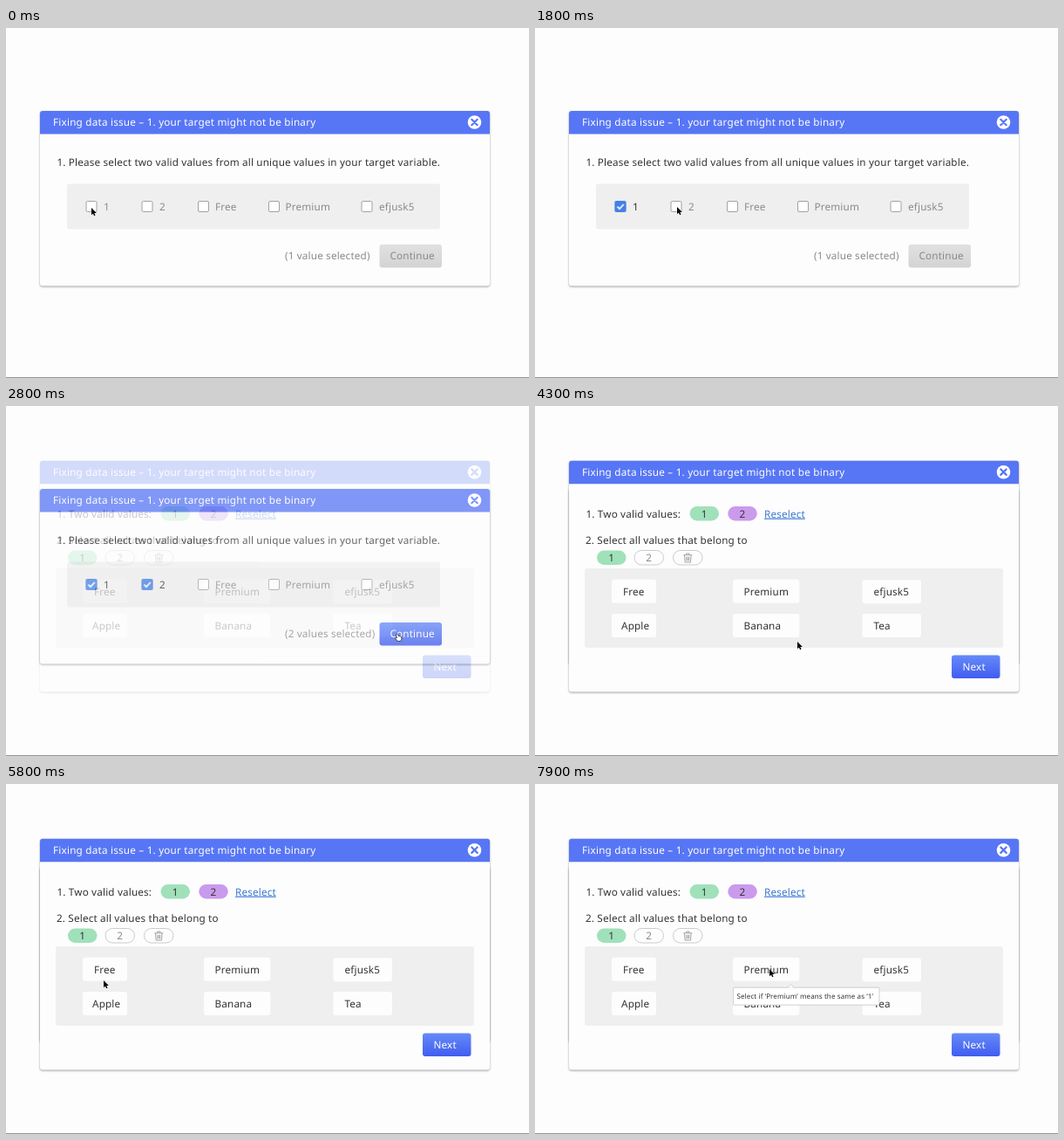
Animation of 600x401 px, one loop 8 s. Source, as an HTML page:

```html
<!DOCTYPE html>
<html lang="en">
<head>
<meta charset="utf-8">
<title>Fixing data issue</title>
<style>
html, body { margin: 0; width: 100%; height: 100%; overflow: hidden; background: #fdfdfd; }
svg { display: block; width: 600px; height: 401px; }
text {
  font: 11.7px "Noto Sans", "Open Sans", sans-serif;
  letter-spacing: .17px;
  text-rendering: geometricPrecision;
  fill: #333;
}
.title { letter-spacing: .22px; fill: #fff; }
.mid { text-anchor: middle; }
.grey { fill: #8a8a8a; }
.white { fill: #fff; }
.link { fill: #3b78d2; text-decoration: underline; }
.dialog { filter: drop-shadow(0 1px 1px rgba(0, 0, 0, .38)); }
.panel { fill: #efefef; }
.card { fill: #fdfdfd; }
.outline { fill: #fdfdfd; stroke: #ccc; }
.box { fill: #fff; stroke: #a2a2a2; }
.tip rect, .tip path { fill: #fff; stroke: #c4c4c4; stroke-width: .8; }
.tip text { font-size: 8px; letter-spacing: .1px; }

/* 100 ms = 1.25% */
.anim { animation: 8s step-end infinite; }
.ripple { animation-name: ripple; }
.check1 { animation-name: check1; }
.label1 { animation-name: label1; }
.check2 { animation-name: check2; }
.label2 { animation-name: label2; }
.before { animation-name: before; }
.after { animation-name: after; }
.second { animation-name: second; }
.tip1 { animation-name: tip1; }
.tip2 { animation-name: tip2; }
.cursor { animation-name: cursor; }
.arrow { animation-name: arrow; }
.hand { animation-name: hand; }

@keyframes ripple {
  0% { opacity: 0; transform: scale(.3); }
  3.75% { opacity: .5; transform: scale(.4); }
  5% { opacity: .35; transform: scale(.7); }
  6.25% { opacity: .2; transform: scale(1); }
  7.5%, 100% { opacity: 0; transform: scale(1); }
}
@keyframes check1 { 0% { opacity: 0; } 12.5% { opacity: .5; } 13.75%, 100% { opacity: 1; } }
@keyframes label1 { 0% { fill: #8a8a8a; } 12.5% { fill: #5e5e5e; } 13.75%, 100% { fill: #333; } }
@keyframes check2 { 0% { opacity: 0; } 23.75% { opacity: .5; } 25%, 100% { opacity: 1; } }
@keyframes label2 { 0% { fill: #8a8a8a; } 23.75% { fill: #5e5e5e; } 25%, 100% { fill: #333; } }
@keyframes before { 0% { opacity: 1; } 25%, 100% { opacity: 0; } }
@keyframes after { 0% { opacity: 0; } 25%, 100% { opacity: 1; } }
@keyframes second {
  0% { opacity: 0; }
  33.75% { opacity: 0; animation-timing-function: steps(4); }
  38.75%, 100% { opacity: 1; }
}
@keyframes tip1 {
  0% { opacity: 0; }
  72.5% { opacity: 0; animation-timing-function: steps(3); }
  76.25% { opacity: 1; }
  83.75%, 100% { opacity: 0; }
}
@keyframes tip2 {
  0% { opacity: 0; }
  85% { opacity: 0; animation-timing-function: steps(2); }
  87.5%, 100% { opacity: 1; }
}
@keyframes cursor {
  0% { transform: translate(98px, 206px); }
  15% { transform: translate(98px, 206px); animation-timing-function: steps(3); }
  18.75% { transform: translate(163px, 205px); }
  25% { transform: translate(163px, 205px); animation-timing-function: steps(6); }
  32.5% { transform: translate(448px, 261px); }
  53.75% { transform: translate(301px, 270px); }
  55% { transform: translate(301px, 270px); animation-timing-function: steps(4); }
  60% { transform: translate(200px, 222px); animation-timing-function: steps(3); }
  63.75% { transform: translate(116px, 213px); }
  65% { transform: translate(116px, 213px); animation-timing-function: steps(5); }
  71.25% { transform: translate(112px, 225px); }
  77.5% { transform: translate(111px, 223px); }
  82.5% { transform: translate(111px, 223px); animation-timing-function: steps(3); }
  86.25%, 100% { transform: translate(269px, 212px); }
}
@keyframes arrow { 0% { opacity: 1; } 32.5% { opacity: 0; } 37.5%, 100% { opacity: 1; } }
@keyframes hand { 0% { opacity: 0; } 32.5% { opacity: 1; } 37.5%, 100% { opacity: 0; } }
</style>
</head>
<body>
<svg viewBox="0 0 600 401">
  <defs>
    <linearGradient id="blue" x2="0" y2="1">
      <stop stop-color="#668af9"/><stop offset="1" stop-color="#405df0"/>
    </linearGradient>
    <linearGradient id="dull" x2="0" y2="1">
      <stop stop-color="#e1e1e1"/><stop offset="1" stop-color="#d3d3d3"/>
    </linearGradient>
    <g id="header">
      <path d="M39 26.5V3a3 3 0 0 1 3-3H552a3 3 0 0 1 3 3V26.5Z" fill="#5776f5"/>
      <text class="title" x="54" y="17.3">Fixing data issue – 1. your target might not be binary</text>
      <circle cx="537.5" cy="13" r="7.8" fill="#fff"/>
      <path d="M534.3 9.8l6.4 6.4m0-6.4l-6.4 6.4" stroke="#5776f5" stroke-width="2.2" stroke-linecap="round"/>
    </g>
    <rect id="box" class="box" x=".5" y=".5" width="12" height="12" rx="1.5"/>
    <g id="tick">
      <rect width="13" height="13" rx="2" fill="#4480e8"/>
      <path d="M3 6.7l2.5 2.6L10.2 4" fill="none" stroke="#fff" stroke-width="1.7"/>
    </g>
    <rect id="pill" width="33.5" height="16.5" rx="8.25"/>
  </defs>

  <rect width="600" height="401" fill="#fdfdfd"/>
  <path d="M0 400.5H600" stroke="#949494"/>

  <g class="dialog">
    <rect x="39" y="95" width="516" height="200.5" rx="3" fill="#fdfdfd"/>
    <use href="#header" y="95"/>
    <text x="58.5" y="158.3">1. Please select two valid values from all unique values in your target variable.</text>
    <rect class="panel" x="70" y="178.5" width="428" height="52" rx="3"/>
    <use href="#box" x="91.5" y="198"/>
    <use href="#box" x="155.5" y="198"/>
    <use href="#box" x="220" y="198"/>
    <use href="#box" x="301" y="198"/>
    <use href="#box" x="407.5" y="198"/>
    <use href="#tick" class="anim check1" x="91.5" y="198"/>
    <use href="#tick" class="anim check2" x="155.5" y="198"/>
    <text class="anim label1" x="112" y="208.8">1</text>
    <text class="anim label2" x="176" y="208.8">2</text>
    <text class="grey" x="240" y="208.8">Free</text>
    <text class="grey" x="320.5" y="208.8">Premium</text>
    <text class="grey" x="428" y="208.8">efjusk5</text>
    <g class="anim before">
      <text class="grey" x="320" y="265.3">(1 value selected)</text>
      <rect x="428.5" y="248" width="71.5" height="26.5" rx="3" fill="url(#dull)"/>
      <text class="grey" x="440.5" y="265.3">Continue</text>
    </g>
    <g class="anim after">
      <text class="grey" x="320" y="265.3">(2 values selected)</text>
      <rect x="428.5" y="248" width="71.5" height="26.5" rx="3" fill="url(#blue)"/>
      <text class="white" x="440.5" y="265.3">Continue</text>
    </g>
  </g>

  <g class="anim second">
    <g class="dialog">
      <rect x="39" y="63" width="516" height="264.5" rx="3" fill="#fdfdfd"/>
      <use href="#header" y="62.7"/>
      <text x="58.5" y="127.6">1. Two valid values:</text>
      <use href="#pill" x="177.5" y="115" fill="#a0e1ba"/>
      <text class="mid" x="194.3" y="127.6">1</text>
      <use href="#pill" x="221.3" y="115" fill="#ca9aec"/>
      <text class="mid" x="238" y="127.6">2</text>
      <text class="link" x="263" y="127.6">Reselect</text>
      <text x="58" y="157.6">2. Select all values that belong to</text>
      <use href="#pill" x="71" y="165.5" fill="#a0e1ba"/>
      <text class="mid" x="87.8" y="178">1</text>
      <use href="#pill" class="outline" x="114" y="165.5"/>
      <text class="mid grey" x="130.8" y="178">2</text>
      <use href="#pill" class="outline" x="158.5" y="165.5"/>
      <path d="M170.3 170.8h10M173.6 170.5v-1.4h3.4v1.4M171.5 171l.6 8h6.4l.6-8M173.8 172.8v4.6M175.3 172.8v4.6M176.8 172.8v4.6" fill="none" stroke="#8f8f8f" stroke-width=".8"/>

      <rect class="panel" x="57" y="186" width="480" height="91" rx="3"/>
      <g class="card">
        <rect x="88" y="198.7" width="51" height="27" rx="3"/>
        <rect x="227" y="198.7" width="76.3" height="27" rx="3"/>
        <rect x="375.5" y="199.3" width="67.5" height="27" rx="3"/>
        <rect x="88" y="238" width="51" height="27" rx="3"/>
        <rect x="227" y="238" width="76.3" height="27" rx="3"/>
        <rect x="375.5" y="238" width="67.5" height="27" rx="3"/>
      </g>
      <text x="101" y="216.5">Free</text>
      <text x="239.5" y="216.5">Premium</text>
      <text x="388.5" y="217">efjusk5</text>
      <text x="99" y="255.8">Apple</text>
      <text x="239.5" y="255.8">Banana</text>
      <text x="388.5" y="255.8">Tea</text>
      <rect x="478" y="285.5" width="55.5" height="26.5" rx="3" fill="url(#blue)"/>
      <text class="white" x="490.5" y="302.8">Next</text>
    </g>
  </g>

  <g class="anim tip tip1">
    <rect x="87.4" y="230.4" width="149.4" height="20" rx="1"/>
    <text x="92" y="243.3">Select if ‘Free’ means the same as ‘1’</text>
  </g>
  <g class="anim tip tip2">
    <rect x="227.4" y="233.2" width="167.6" height="20" rx="1"/>
    <path d="M289.5 233.5l4-3.8 4 3.8"/>
    <text x="231.5" y="246.1">Select if ‘Premium’ means the same as ‘1’</text>
  </g>

  <g transform="translate(98 206)">
    <circle class="anim ripple" r="12.5" fill="none" stroke="#888"/>
  </g>
  <g class="anim cursor">
    <path class="anim arrow" d="M0 0V8.2L1.9 6.5 3.1 9.2 4.5 8.6 3.3 6H5.9Z" fill="#000" stroke="#fff" stroke-width=".7" paint-order="stroke"/>
    <path class="anim hand" d="M.2 0Q1.4-.5 1.7.7L2.2 2.6Q4.5 2.4 5.6 3.6L6 6 4.8 8.4H1.2L-1.5 5.2Q-1.6 4 .3 4.8L-.5 1Q-.6.2.2 0Z" fill="#fff" stroke="#222" stroke-width=".8"/>
  </g>
</svg>
</body>
</html>
```
